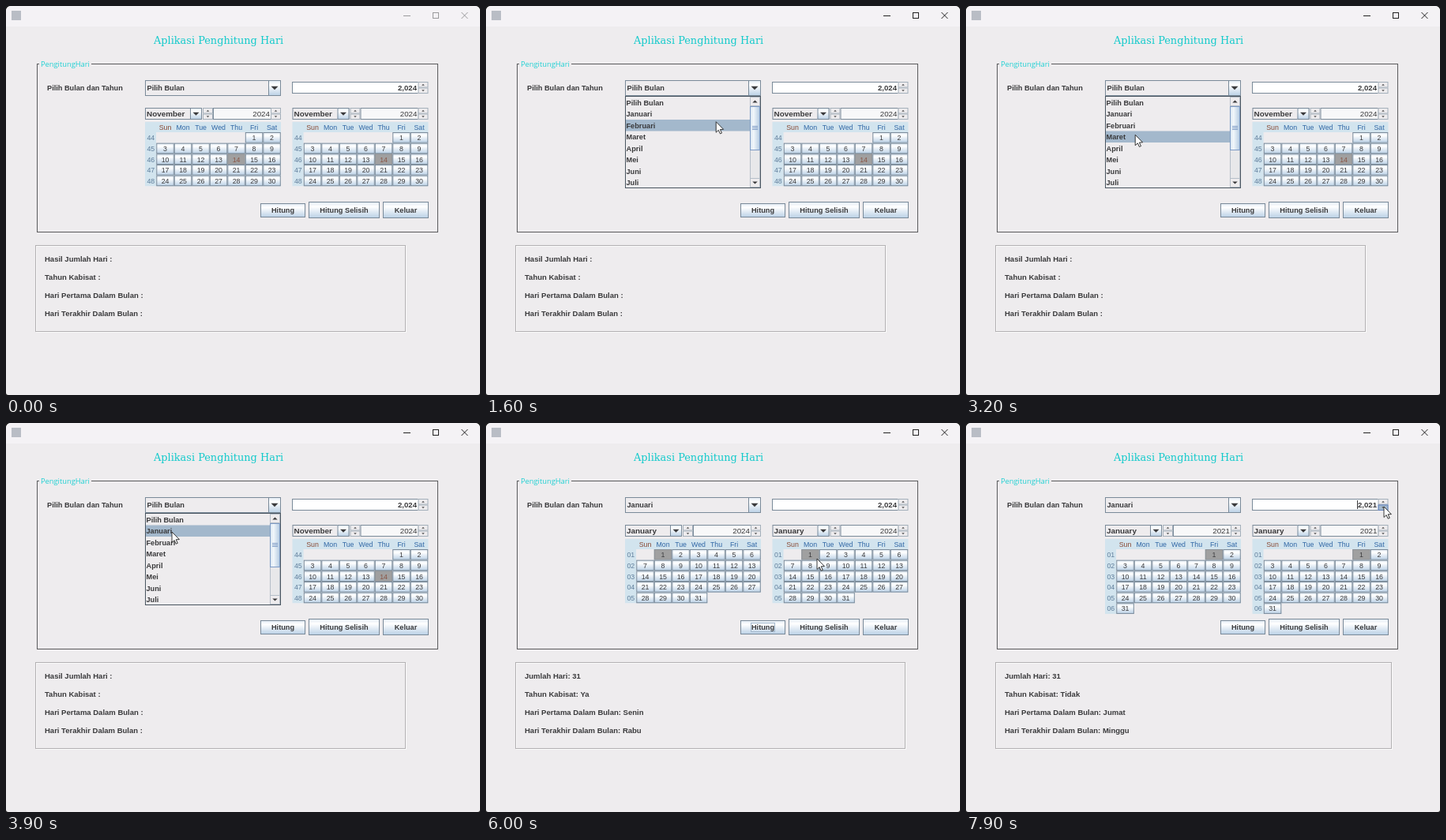
Write an HTML page with a canvas that moves like this. It is 600 by 493 pixels and loops after 8000 ms.

```html
<!DOCTYPE html>
<html lang="id">
<head>
<meta charset="utf-8">
<style>
html, body { margin: 0; width: 100%; height: 100%; overflow: hidden; background: #1c1c1c; }
canvas { display: block; }
</style>
</head>
<body>
<canvas id="stage" width="600" height="493"></canvas>
<script>
const ctx = document.getElementById('stage').getContext('2d');
const LOOP = 8000;
const SANS = '"Liberation Sans", Arial, sans-serif';
const BOLD = `bold 9.2px ${SANS}`;
const RESULT = `bold 9.5px ${SANS}`;
const INK = '#3a3a3c', EDGE = '#7a8a99', PANEL = '#eeecee', SELECT = '#a3b8cc';
const MONTHS = ['Pilih Bulan', 'Januari', 'Februari', 'Maret', 'April', 'Mei', 'Juni', 'Juli'];
const DAYS = ['Minggu', 'Senin', 'Selasa', 'Rabu', 'Kamis', 'Jumat', 'Sabtu'];
const HEADS = ['Sun', 'Mon', 'Tue', 'Wed', 'Thu', 'Fri', 'Sat'];
const ITEM = 14.5, LIST_TOP = 115;

// Moments of the clicks, in ms
const APPEAR = 500, OPEN = 1000, PICK = 4200, COUNT = 5100;
const YEAR_CLICKS = [7000, 7400, 7800];

// Pointer stops: time, x, y
const PATH = [
  [500, 372, 150], [900, 339, 103], [1250, 339, 103], [2050, 222, 210], [2600, 222, 210],
  [3600, 210, 138], [4200, 210, 138], [4800, 357, 263], [5300, 357, 263],
  [5900, 419, 172], [6200, 419, 172], [6750, 529, 106], [8000, 529, 106]
];

function pointerAt(t) {
  const i = PATH.findIndex(stop => stop[0] > t);
  if (i < 1) return PATH[0].slice(1);
  const [t0, x0, y0] = PATH[i - 1], [t1, x1, y1] = PATH[i];
  const u = (t - t0) / (t1 - t0), e = u * u * (3 - 2 * u);
  return [x0 + (x1 - x0) * e, y0 + (y1 - y0) * e];
}

function text(str, x, y, font = BOLD, color = INK, align = 'left') {
  ctx.font = font;
  ctx.fillStyle = color;
  ctx.textAlign = align;
  ctx.fillText(str, x, y);
}

function fill(x, y, w, h, color) {
  ctx.fillStyle = color;
  ctx.fillRect(x, y, w, h);
}

function box(x, y, w, h, color, edge = EDGE, width = 1) {
  if (color) fill(x, y, w, h, color);
  ctx.strokeStyle = edge;
  ctx.lineWidth = width;
  ctx.strokeRect(x + width / 2, y + width / 2, w - width, h - width);
}

function metal(x, y, w, h) {
  const g = ctx.createLinearGradient(0, y, 0, y + h);
  g.addColorStop(0, '#dfe9f3');
  g.addColorStop(0.3, '#fff');
  g.addColorStop(1, '#b8cfe5');
  box(x, y, w, h, g);
}

function poly(points, color) {
  ctx.beginPath();
  points.forEach(([x, y]) => ctx.lineTo(x, y));
  ctx.closePath();
  ctx.fillStyle = color;
  ctx.fill();
}

// dir: 1 points down, -1 points up
function arrow(x, y, size, dir, color = INK) {
  poly([[x - size, y - dir * size / 2], [x + size, y - dir * size / 2], [x, y + dir * size / 2]], color);
}

function spinButtons(x, y, h, pressed) {
  const half = h / 2;
  box(x, y, 13, half, PANEL, '#a3afba');
  box(x, y + half, 13, half, pressed ? SELECT : PANEL, pressed ? '#6382bf' : '#a3afba');
  arrow(x + 6.5, y + half / 2, 1.8, -1, '#555');
  arrow(x + 6.5, y + half * 1.5, 1.8, 1, '#555');
}

function button(label, x, y, w, h, { hover, focus } = {}) {
  metal(x, y, w, h);
  if (hover) box(x + 1, y + 1, w - 2, h - 2, null, '#8fa9c4', 1.5);
  text(label, x + w / 2, y + h / 2 + 3.3, BOLD, INK, 'center');
  if (focus) box(x + 13, y + 3, w - 26, h - 6, null, SELECT);
}

function calendar(x, year, month, selected) {
  box(x, 129, 72, 15, PANEL);
  metal(x + 57, 129, 15, 15);
  arrow(x + 64.5, 136.7, 4, 1);
  text(month ? 'November' : 'January', x + 2, 140, `bold 9.9px ${SANS}`);
  spinButtons(x + 73, 129, 15);
  box(x + 86, 129, 74, 15, '#f8f8f9');
  text(year, x + 158, 140.3, `9.8px ${SANS}`, INK, 'right');
  spinButtons(x + 159, 129, 15);

  const first = new Date(year, month, 1).getDay();
  const count = new Date(year, month + 1, 0).getDate();
  const rows = Math.ceil((first + count) / 7);
  const colW = 22.5, rowH = 13.65, left = x + 14.3, top = 160;
  const small = `8.8px ${SANS}`;
  fill(x, 147, 172, 13, '#d2e4ee');
  fill(x, top, 14, rows * rowH, '#d2e4ee');
  HEADS.forEach((name, i) =>
    text(name, left + colW * (i + 0.5), 156.8, small, i ? '#2f66a5' : '#8a4a35', 'center'));
  for (let r = 0; r < rows; r++) {
    const week = String((month ? 44 : 1) + r).padStart(2, '0');
    text(week, x + 7.3, top + r * rowH + 10.2, small, '#617f9c', 'center');
  }
  for (let d = 1; d <= count; d++) {
    const cell = first + d - 1;
    const cx = left + cell % 7 * colW, cy = top + Math.floor(cell / 7) * rowH;
    if (d === selected) box(cx, cy, colW, rowH, '#a0a0a0', '#8b9197');
    else metal(cx, cy, colW, rowH);
    text(d, cx + colW / 2, cy + 10.2, small, month && d === selected ? '#8a5545' : INK, 'center');
  }
}

function windowFrame(active) {
  fill(0, 0, 600, 493, '#1c1c1c');
  ctx.beginPath();
  ctx.roundRect(0, 0, 600, 493, [6, 6, 3, 3]);
  ctx.fillStyle = PANEL;
  ctx.fill();
  ctx.save();
  ctx.clip();
  fill(0, 0, 600, 26, '#f4f2f5');
  ctx.restore();
  fill(7, 6, 12, 12, '#b9bdc5');

  const mark = active ? '#222' : '#9a9a9c';
  fill(503, 12, 9, 1, mark);
  box(540, 8, 8, 8, null, mark);
  ctx.beginPath();
  ctx.moveTo(576.5, 8); ctx.lineTo(584.5, 16);
  ctx.moveTo(584.5, 8); ctx.lineTo(576.5, 16);
  ctx.stroke();
}

function popup(highlight) {
  box(176, 114, 172, 117, PANEL, '#4a5560');
  fill(177, LIST_TOP + highlight * ITEM, 157, ITEM, SELECT);
  MONTHS.forEach((name, i) => text(name, 177.5, LIST_TOP + i * ITEM + 10.9));
  box(334, 115, 13, 115, '#e8e8ea', '#b5bec8');
  box(334, 115, 13, 12, PANEL, '#b5bec8');
  box(334, 218, 13, 12, PANEL, '#b5bec8');
  arrow(340.5, 121, 3.2, -1);
  arrow(340.5, 224, 3.2, 1);
  const g = ctx.createLinearGradient(334, 0, 347, 0);
  g.addColorStop(0, '#d5e3f0');
  g.addColorStop(0.35, '#f2f7fb');
  g.addColorStop(1, '#b0c8e0');
  box(334, 127, 13, 56, g, '#7f9cc6');
  for (let y = 152; y < 158; y += 2) fill(337, y, 7, 1, '#7f9cc6');
}

function results(counted, year) {
  const end = last => DAYS[new Date(year, last ? 1 : 0, last ? 0 : 1).getDay()];
  const leap = new Date(year, 2, 0).getDate() === 29;
  const lines = counted
    ? ['Jumlah Hari: 31', `Tahun Kabisat: ${leap ? 'Ya' : 'Tidak'}`,
       `Hari Pertama Dalam Bulan: ${end(false)}`, `Hari Terakhir Dalam Bulan: ${end(true)}`]
    : ['Hasil Jumlah Hari :', 'Tahun Kabisat :', 'Hari Pertama Dalam Bulan :', 'Hari Terakhir Dalam Bulan :'];
  ctx.font = RESULT;
  const widest = Math.max(...lines.map(line => ctx.measureText(line).width));
  const right = Math.round(49 + widest + 332);
  box(38, 304, right - 37, 110, null, '#fafafa');
  box(37, 303, right - 37, 110, null, '#b2b0b2');
  lines.forEach((line, i) => text(line, 49, 324.3 + i * 22.8, RESULT));
}

function pointer(x, y) {
  const shape = [[0, 0], [0, 13.5], [3.1, 10.6], [5.2, 15.2], [7.3, 14.3], [5.2, 9.8], [9.4, 9.6]];
  poly(shape.map(([dx, dy]) => [x + dx, y + dy]), '#fff');
  ctx.strokeStyle = '#222';
  ctx.lineWidth = 0.9;
  ctx.stroke();
}

function draw(t) {
  const [px, py] = pointerAt(t);
  const open = t >= OPEN && t < PICK;
  const counted = t >= COUNT;
  const clicks = YEAR_CLICKS.filter(c => t >= c).length;
  const year = 2024 - clicks;

  windowFrame(t >= OPEN);
  text('Aplikasi Penghitung Hari', 187, 48, '12.9px "DejaVu Serif", serif', '#12cacb');
  box(39, 73, 508, 214, null, '#5a5a5c');
  fill(42, 72, 66, 3, PANEL);
  text('PengitungHari', 44, 77, '9.3px "Open Sans", sans-serif', '#1fd0d3');
  text('Pilih Bulan dan Tahun', 52, 107.3);

  box(176, 94, 172, 20, PANEL);
  if (t >= PICK && t < COUNT) fill(177, 95, 156, 18, SELECT);
  metal(332, 94, 16, 20);
  arrow(340, 104, 4.5, 1);
  text(t >= PICK ? MONTHS[1] : MONTHS[0], 178.5, 107.3);

  box(362, 96, 161, 15, '#fff');
  text(year.toLocaleString('en-US'), 520, 107.3, `bold 9.6px ${SANS}`, INK, 'right');
  if (clicks) fill(495, 98, 1, 11, INK);
  spinButtons(521.5, 96, 15, clicks > 0);

  const month = counted ? 0 : 10, selected = counted ? 1 : 14;
  if (!open) calendar(176, year, month, selected);
  calendar(362.5, year, month, selected);

  const overCount = t > PICK && px > 322 && px < 379 && py > 250 && py < 268;
  button('Hitung', 322, 250, 57, 18, { hover: overCount, focus: counted && !clicks });
  button('Hitung Selisih', 383, 248, 90, 21);
  button('Keluar', 477, 248, 58, 21);
  results(counted, year);

  if (open) popup(Math.max(0, Math.min(7, Math.floor((py - LIST_TOP) / ITEM))));
  if (t >= APPEAR) pointer(px, py);
}

function tick() {
  draw(performance.now() % LOOP);
  requestAnimationFrame(tick);
}
tick();
</script>
</body>
</html>
```
